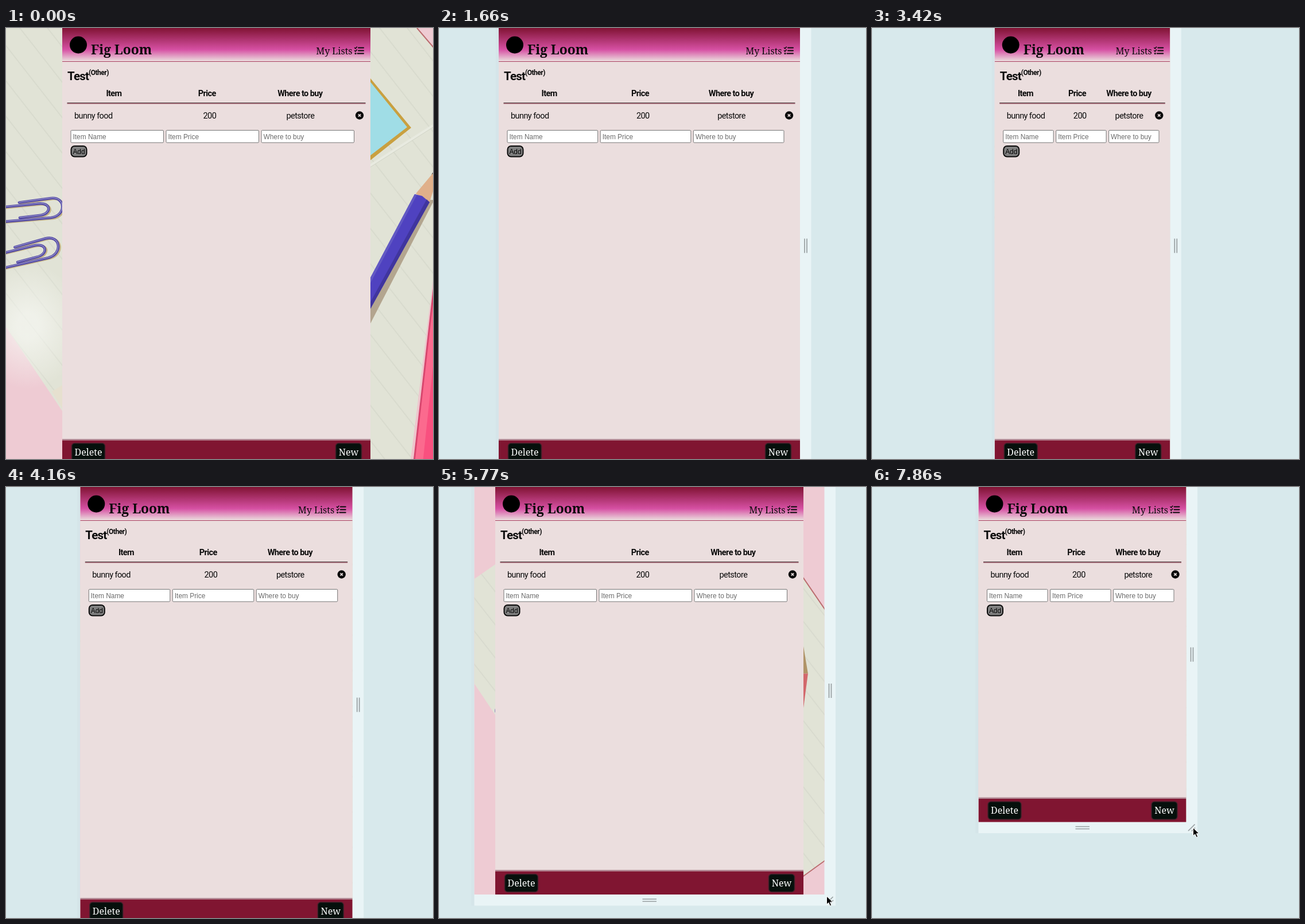
Animation of 744x752 px, one loop 8 s. Source, as an HTML page:

```html
<!DOCTYPE html>
<html lang="en">
<head>
<meta charset="utf-8">
<title>Shopping list, resizing</title>
<style>
  html, body { margin: 0; width: 100%; height: 100%; overflow: hidden; background: #d8e9ec; }
  svg { display: block; }
  #stage { width: 744px; height: 752px; }
  .sans { font-family: Roboto, "Open Sans", sans-serif; font-size: 14.5px; letter-spacing: -.04em; fill: #0a0a0a; }
  .bold { font-weight: 700; }
  .serif { font-family: "Noto Serif", "Liberation Serif", serif; font-size: 16px; fill: #0a0a0a; }
  .brand { font-size: 22.8px; font-weight: 700; }
  .form { font-family: "Liberation Sans", Arial, sans-serif; font-size: 11.9px; }
  .mid { text-anchor: middle; }
  .end { text-anchor: end; }
  .grip { stroke: #989fa1; stroke-width: 1.7; fill: none; }
</style>
</head>
<body>
<svg id="stage" viewBox="0 0 744 752">
  <defs>
    <linearGradient id="head" x2="0" y2="1">
      <stop offset="0" stop-color="#801333"/>
      <stop offset=".65" stop-color="#d650a3"/>
      <stop offset="1" stop-color="#ebdede"/>
    </linearGradient>
    <radialGradient id="glare">
      <stop offset=".2" stop-color="#f8f9f5" stop-opacity=".65"/>
      <stop offset="1" stop-color="#f8f9f5" stop-opacity="0"/>
    </radialGradient>
    <pattern id="ruled" width="38" height="38" patternUnits="userSpaceOnUse" patternTransform="rotate(52)">
      <rect width="38" height="38" fill="#e1e3d6"/>
      <path d="M0 19H38" stroke="#cdcfc4" stroke-width=".9"/>
    </pattern>
    <clipPath id="clip"><rect id="view"/></clipPath>
    <path id="paperclip" fill="none" stroke-linecap="round"
      d="M23 304.5L78 297C105 294 105 328 78 331L-40 341C-66 342 -66 318 -40 316L56 306.5C80 304 80 325 58 327L24 331"/>
    <g id="check" fill="none" stroke="#0a0a0a" stroke-width="2" stroke-linecap="round">
      <path d="M-1.5 -5H7.5M-1.5 0H7.5M-3 5H7.5"/>
      <path d="M-8 -5L-6.6 -3.6L-4.2 -6.5M-8 0L-6.6 1.4L-4.2 -1.5" stroke-width="1.6"/>
      <circle cx="-6.5" cy="5" r=".6"/>
    </g>
  </defs>

  <rect width="744" height="752" fill="#d8e9ec"/>
  <rect id="shade" fill="#cfdde3" opacity=".35"/>
  <rect id="rim" fill="#e9f4f6"/>
  <path id="gripR" class="grip" d="M8 -12.5V12.5M12 -12.5V12.5"/>
  <path id="gripB" class="grip" d="M354.5 8H379M354.5 12H379"/>
  <path id="gripC" class="grip" d="M3.5 15.5L15 4M9.5 16L15.5 10"/>

  <g clip-path="url(#clip)">
    <g id="desk">
      <rect x="-110" width="1100" height="770" fill="#eecbd3"/>
      <path d="M-110 176L-64 144L-20 0H440V770H166L-110 357Z" fill="url(#ruled)"/>
      <path d="M80 634L110 616V683Z" fill="#e6e0cf"/>
      <ellipse cx="38" cy="520" rx="95" ry="110" fill="url(#glare)"/>
      <path d="M440 68L552 232L620 0H716L990 322V770H605L556 692L440 776Z" fill="url(#ruled)"/>
      <path d="M440 68L552 232M556 692L440 776M716 0L990 322" stroke="#bb6c6f" stroke-width="2"/>
      <path d="M600 262L760 160" stroke="#e8eae0" stroke-width="4"/>
      <path d="M600 265L760 163" stroke="#d2d5c8"/>
      <path d="M706 174L612 60L555 150L612 249Z" fill="#c9a040"/>
      <path d="M699 173L612 66L555 146L612 240Z" fill="#a0dde6"/>
      <path d="M500 240L518 348H500Z" fill="#b09468"/>
      <path d="M518 348L490 560V348Z" fill="#d2686c"/>
      <path d="M746 300L575 632V590L735 300Z" fill="#b3a58f"/>
      <path d="M714 289L760 234L738 304Z" fill="#e0b08a"/>
      <path d="M741 256L760 230V244Z" fill="#4b4440"/>
      <path d="M712 290L725 293L738 304L575 598V549Z" fill="#4f42c0"/>
      <path d="M712 290L716 291L575 559V549Z" fill="#6259c4"/>
      <path d="M733 299L738 304L575 598V588Z" fill="#40359e"/>
      <path d="M703 770L744 440H800V770Z" fill="#eec5cd"/>
      <path d="M708 770L748 420H900V770Z" fill="#d8466e"/>
      <path d="M711 770L751 420H900V770Z" fill="#fb6a8e"/>
      <path d="M725 770L762 420H900V770Z" fill="#f9507f"/>
      <g id="clips"></g>
    </g>

    <rect id="panel" y="0" fill="#ebdede"/>

    <g id="left">
      <text class="sans bold" x="9" y="91" style="font-size:20.5px">Test</text>
      <text class="sans bold" x="46" y="82.3" style="font-size:12px">(Other)</text>
    </g>

    <g id="bar">
      <rect id="barFill" fill="url(#head)"/>
      <rect id="barLine" height="1" fill="#a93e60"/>
    </g>
    <g id="brandWide">
      <circle cx="28" cy="29.5" r="15"/>
      <text class="serif brand" x="50" y="45.5">Fig Loom</text>
    </g>
    <g id="brandTall">
      <circle cx="28" cy="31" r="15"/>
      <text class="serif brand" x="50" y="47.5">Fig</text>
      <text class="serif brand" x="12" y="88">Loom</text>
    </g>
    <g id="navWide">
      <text class="serif end" x="-31.5" y="45.5">My Lists</text>
      <use href="#check" x="-19.5" y="39.5"/>
    </g>
    <g id="navTall">
      <text class="serif mid" x="-53" y="18.5">My Lists</text>
      <use href="#check" x="-53" y="41"/>
    </g>

    <g id="heads"></g>
    <g id="rows">
      <rect id="rule1" y="130" height="1.2" fill="#5f5555"/>
      <rect id="rule2" y="131.2" height="1.2" fill="#8d3f52"/>
      <g id="item">
        <text class="sans" x="21" y="158">bunny food</text>
        <rect x="15.5" y="206" width="27" height="18.5" rx="6" fill="#808080" stroke="#0a0a0a" stroke-width="2"/>
        <text class="form mid" x="29" y="219.5">Add</text>
      </g>
      <text id="price" class="sans mid" y="158">200</text>
      <text id="shop" class="sans mid" y="158">petstore</text>
      <g id="del">
        <circle cx="-19" cy="152.5" r="7.2" fill="#0a0a0a"/>
        <path d="M-21.2 150.3L-16.8 154.7M-16.8 150.3L-21.2 154.7" stroke="#ebdede" stroke-width="1.7"/>
      </g>
      <g id="fields"></g>
    </g>

    <rect id="footLine" height="2.5" fill="#b38b96"/>
    <rect id="foot" height="43" fill="#801531"/>
    <g id="btnL">
      <rect x="16.5" y="-35.5" width="58" height="31" rx="5" fill="#06100c" stroke="#42202a" stroke-width="1.6"/>
      <text class="serif mid" x="45.5" y="-14.5" style="fill:#fff">Delete</text>
    </g>
    <g id="btnR">
      <rect x="-60.5" y="-35.5" width="45" height="31" rx="5" fill="#06100c" stroke="#42202a" stroke-width="1.6"/>
      <text class="serif mid" x="-38" y="-14.5" style="fill:#fff">New</text>
    </g>
  </g>

  <path id="cursor" d="M0 0V14.2L3.3 11.2L5.8 16.8L8.2 15.7L5.8 10.3L10.3 10Z" fill="#000" stroke="#fff" stroke-width="1"/>
</svg>

<script>
const LOOP = 8000, STEP = 147.7, FIRST = 155;
const MID = 366.5, MAX_HALF = 268.5, RIM = 19.5;
const NS = "http://www.w3.org/2000/svg";

// step, half width of the viewport, its height, pointer offset from its corner
const POSES = [
  [-1, 470, 760, 4, 3], [7, 319.5, 760, 4, 3], [10, 262.5, 760, 4, 3],
  [15, 140.5, 760, 4, 3], [16, 124.75, 760, 4, 3], [18, 119, 760, 4, 3],
  [20, 119, 760, 4, 3], [27, 237.2, 760, 4, 3], [28, 254.5, 760, 4, 3],
  [32, 345, 760, 4, 3], [34, 372, 760, 4, 3], [36, 339.5, 760, 4, 3],
  [37, 323, 738, 4, 3], [38, 305, 711, 4, 3], [42, 201.3, 601, 1, 3],
  [44, 140.5, 574, 1, 3], [46, 119, 565, 1, 3], [49, 119, 565, 1, 3],
  [52, 181, 584.5, 12, 10]
];

const $ = id => document.getElementById(id);
const set = (el, attrs) => { for (const k in attrs) el.setAttribute(k, attrs[k]); return el; };
const put = (id, attrs) => set($(id), attrs);
const move = (id, x, y = 0) => put(id, { transform: `translate(${x} ${y})` });
const show = (id, on) => put(id, { display: on ? "inline" : "none" });

function add(parent, tag, attrs, text) {
  const el = set(document.createElementNS(NS, tag), attrs);
  if (text) el.textContent = text;
  return parent.appendChild(el);
}

// Paper clips: shadow, wire, highlight
const LAYERS = [["#c3b184", 4, 2.5, 1.5], ["#5148a6", 4.6, 0, 0], ["#8f8ac4", 1.5, -.3, -.5]];
for (const turn of ["", "translate(-6 74) rotate(-8 50 318)"]) {
  const g = add($("clips"), "g", { transform: turn });
  for (const [color, width, x, y] of LAYERS)
    add(g, "use", { href: "#paperclip", x, y, stroke: color, "stroke-width": width });
}

const heads = ["Item", "Price", "Where to buy"].map(label => {
  const g = add($("heads"), "g", {});
  add(g, "text", { class: "sans bold mid", y: 118.5 }, label);
  return g;
});
const lastHead = heads[2].firstChild;
const lowHead = add(heads[2], "text", { class: "sans bold mid", y: 135 }, "buy");

const fields = ["Item Name", "Item Price", "Where to buy"].map(hint => {
  const box = add($("fields"), "rect", { y: 178.5, height: 21.5, rx: 1.5, fill: "#fff", stroke: "#767676" });
  const pane = add($("fields"), "svg", { y: 178, height: 22 });
  add(pane, "text", { class: "form", x: 0, y: 15.7, fill: "#6c6c6c" }, hint);
  return { box, pane };
});

function poseAt(k) {
  const i = POSES.findIndex(p => p[0] >= k);
  if (i <= 0) return POSES[i ? POSES.length - 1 : 0].slice(1);
  const a = POSES[i - 1], b = POSES[i], f = (k - a[0]) / (b[0] - a[0]);
  return a.slice(1).map((v, n) => v + (b[n + 1] - v) * f);
}

function drawFrame([half, high, dx, dy]) {
  const vl = MID - half, vr = MID + half;
  const reach = Math.min(half, MAX_HALF), l = MID - reach, r = MID + reach, w = 2 * reach;

  put("view", { x: vl, y: 0, width: 2 * half, height: high });
  put("rim", { x: vl, y: 0, width: 2 * half + RIM, height: high + RIM });
  put("shade", { x: vl - 5, y: 0, width: 6, height: high + RIM });
  move("gripR", vr, high / 2);
  move("gripB", 0, high);
  move("gripC", vr, high);
  move("cursor", vr + dx, high + dy);
  put("desk", { transform: `translate(${vl} 0) scale(${high / 760}) translate(103.5 0)` });
  put("panel", { x: l, width: w, height: high });

  const tall = w < 258, barHigh = tall ? 100 : 58;
  put("barFill", { x: l, width: w, height: barHigh });
  put("barLine", { x: l, y: barHigh, width: w });
  show("brandWide", !tall); show("navWide", !tall);
  show("brandTall", tall); show("navTall", tall);
  for (const id of ["left", "brandWide", "brandTall", "item"]) move(id, l);
  for (const id of ["navWide", "navTall", "del"]) move(id, r);

  const grow = w - 249.5, wrap = w < 272;
  const col = i => l + 45 + .1565 * grow + i * (72.5 + .312 * grow);
  heads.forEach((g, i) => set(g, { transform: `translate(${col(i)} 0)` }));
  lastHead.textContent = wrap ? "Where to" : "Where to buy";
  set(lowHead, { display: wrap ? "inline" : "none" });

  move("rows", 0, wrap ? 16.8 : 0);
  for (const id of ["rule1", "rule2"]) put(id, { x: l + 8.5, width: w - 17 });
  put("price", { x: col(1) + 4.7 });
  put("shop", { x: col(2) + .5 });
  const pitch = 74 + .32 * grow;
  fields.forEach(({ box, pane }, i) => {
    const x = l + 15 + i * pitch;
    set(box, { x, width: pitch - 4.5 });
    set(pane, { x: x + 3.5, width: pitch - 11 });
  });

  put("footLine", { x: l, y: high - 43, width: w });
  put("foot", { x: l, y: high - 40.5, width: w });
  move("btnL", l, high);
  move("btnR", r, high);
}

const start = performance.now();
function tick() {
  const t = (performance.now() - start) % LOOP;
  drawFrame(poseAt(Math.floor((t - FIRST) / STEP)));
  requestAnimationFrame(tick);
}
tick();
</script>
</body>
</html>
```
